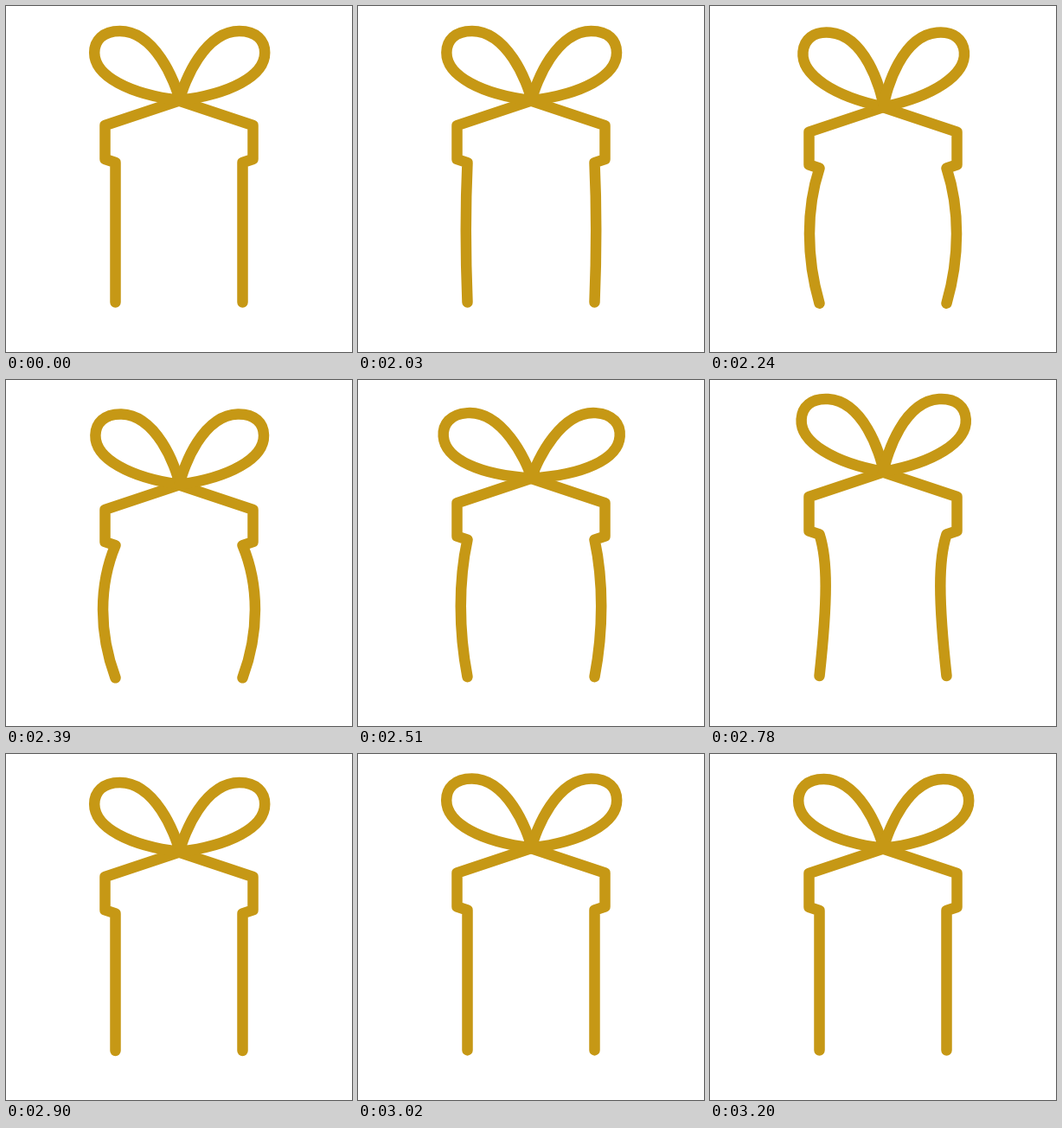
An HTML page that plays this animation: 400x400 px, repeating every 3.23 s.

```html
<!DOCTYPE html>
<html lang="en">
<head>
<meta charset="utf-8">
<title>Bouncing gift</title>
<style>
  html, body { margin: 0; height: 100%; overflow: hidden; background: #fff; }
  svg { display: block; width: 100%; height: 100%; }
  path { fill: none; stroke: #c69815; stroke-width: 12.5; stroke-linecap: round; stroke-linejoin: round; }
</style>
</head>
<body>
<svg viewBox="0 0 400 400">
  <path id="box"/>
  <path id="bow" d="M0 0C-5 -22 -29 -80 -69 -80C-89 -80 -98.5 -69 -98.5 -55C-98.5 -28 -58 -7 0 0"/>
  <use href="#box" transform="translate(400) scale(-1 1)"/>
  <use href="#bow" transform="translate(401.4) scale(-1 1)"/>
</svg>
<script>
const LOOP = 3230, STEP = 30;
const REST = 2000, LEAP = 2410, PEAK = 2700, HALF_BOUNCE = 200;

const box = document.getElementById('box');
const bow = document.getElementById('bow');

const progress = (t, from, to) => Math.min(1, Math.max(0, (t - from) / (to - from)));
const ease = (t, from, to) => (1 - Math.cos(Math.PI * progress(t, from, to))) / 2;

// Crouch, leap, then a damped bounce back to rest
function lidDrop(t) {
  if (t < PEAK) return 12 * ease(t, REST, LEAP) - 29 * ease(t, LEAP, PEAK);
  const s = (t - PEAK) / HALF_BOUNCE;
  return -17 * Math.exp(-1.44 * s) * Math.cos(Math.PI * s);
}

// Sides swell while crouching and pinch in at the leap
function sideBend(t) {
  return -14.5 * Math.sin(Math.PI / 2 * progress(t, REST, LEAP)) +
    25.5 * ease(t, LEAP, PEAK) - 11 * ease(t, PEAK, PEAK + HALF_BOUNCE);
}

// Loops fold up on the way down and droop on the way up (degrees)
function bowTilt(t) {
  return 5.2 * ease(t, REST, 2260) - 9.5 * ease(t, 2260, 2550) +
    9.5 * ease(t, 2550, 2670) - 5.2 * ease(t, PEAK, PEAK + HALF_BOUNCE);
}

function boxPath(lid, bend) {
  const corner = 138 + lid, rim = 177 + lid * 0.85;
  const top = rim + 4, end = 342.5 + lid * 0.15;
  const [c1, c2] = bend > 0 ? [0.18, 0.46] : [0.3, 0.66];
  const x = 126.5 + bend * 4 / 3, y = c => top + (end - top) * c;
  return `M200 ${corner - 28.5}L114.5 ${corner}V${rim}L126.5 ${top}` +
    `C${x} ${y(c1)} ${x} ${y(c2)} 126.5 ${end}`;
}

function draw(now) {
  const t = Math.floor((now % LOOP + 10) / STEP) * STEP - 10;
  const pose = t > REST ? t : REST;
  const lid = lidDrop(pose);
  box.setAttribute('d', boxPath(lid, sideBend(pose)));
  bow.setAttribute('transform', `translate(200.7 ${109 + lid}) rotate(${bowTilt(pose)})`);
  requestAnimationFrame(draw);
}
draw(performance.now());
</script>
</body>
</html>
```
